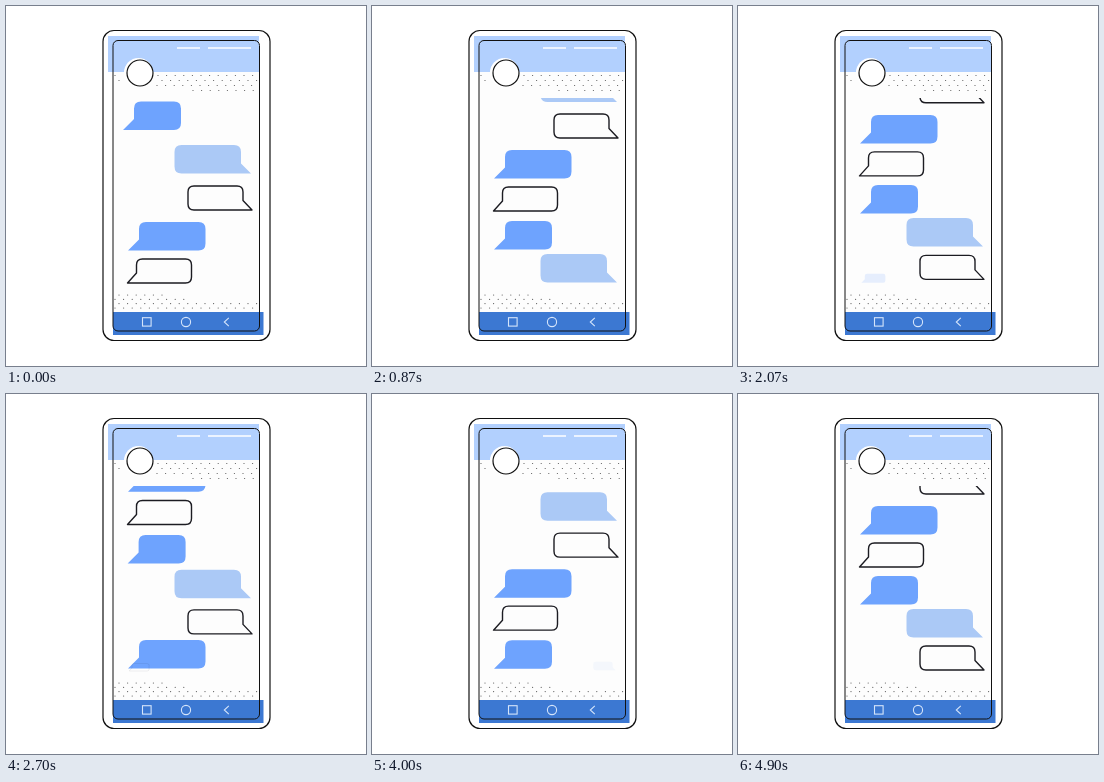
Recreate the animation shown at these times as an HTML page. Size 360 px wide and 360 px high, loop 5400 ms.

```html
<!DOCTYPE html>
<html lang="en">
<head>
<meta charset="utf-8">
<title>Chat on a phone</title>
<style>
  html, body { margin: 0; width: 100%; height: 100%; overflow: hidden; background: #fff; }
  svg { display: block; width: 100vw; height: 100vh; }
</style>
</head>
<body>
<svg viewBox="0 0 360 360" fill="none">
  <defs><clipPath id="view"><rect x="108" y="92" width="145" height="213"/></clipPath></defs>
  <rect x="97" y="24.5" width="167" height="310" rx="11" fill="#fff" stroke="#111" stroke-width="1.2"/>
  <rect x="107" y="35" width="146.5" height="290" rx="5" fill="#fdfdfd"/>
  <path d="M102 30H253V66H102Z" fill="#b2d0fe"/>
  <path d="M171 42H194M202 42H245" stroke="#fff" stroke-width="1.3"/>
  <g id="dots" fill="#555"></g>
  <path d="M107 306H257.5V329H107Z" fill="#3c78d2"/>
  <rect x="107" y="34.5" width="146.5" height="290.5" rx="5" stroke="#111"/>
  <g stroke="#d5e5fb" stroke-width="1.1">
    <rect x="136.5" y="311.7" width="8.6" height="8.4"/>
    <circle cx="180" cy="316" r="4.6"/>
    <path d="M222.8 311.8L218.3 316L222.8 320.2"/>
  </g>
  <circle cx="132.5" cy="66.5" r="14.5" fill="#fff"/>
  <circle cx="134" cy="67" r="13" fill="#fff" stroke="#111" stroke-width="1.2"/>
  <g id="chat" clip-path="url(#view)"></g>
</svg>
<script>
const LOOP = 5400;
const $ = id => document.getElementById(id);

function add(parent, tag, attrs) {
  const el = document.createElementNS('http://www.w3.org/2000/svg', tag);
  for (const key in attrs) el.setAttribute(key, attrs[key]);
  return parent.appendChild(el);
}

// Staggered dots: y, first x, last x
[[69.5, 109, 251], [74.5, 113, 251], [79.5, 151, 251], [84.5, 187, 251],
 [289, 113, 158], [293.3, 109, 185], [297.6, 113, 251], [302, 109, 251]]
  .forEach(([y, from, to]) => {
    for (let x = from; x <= to; x += 8.6) {
      if (y < 82 && Math.hypot(x - 134, y - 67) < 17) continue;
      add($('dots'), 'circle', { cx: x, cy: y, r: 0.6 });
    }
  });

// Bubble with its tail at the bottom; dir is 1 when the tail points left
function bubble(tail, near, far, h, r, notch, dir) {
  const d = r * dir;
  return `M${tail} ${h}L${near} ${notch}V${r}Q${near} 0 ${near + d} 0H${far - d}` +
    `Q${far} 0 ${far} ${r}V${h - r}Q${far} ${h} ${far - d} ${h}Z`;
}

const line = { stroke: '#1c1c22', 'stroke-width': 1.4, 'stroke-linejoin': 'round' };
const kinds = {
  short: { d: bubble(122, 133, 180, 28.5, 7, 17.5, 1), style: { fill: '#6ea3fe' }, x: 124, h: 28 },
  light: { d: bubble(245, 235, 168.5, 28.5, 7, 18.5, -1), style: { fill: '#abc9f6' }, x: 243, h: 28 },
  right: { d: bubble(246, 237, 182, 24, 6, 14.5, -1), style: line, x: 244, h: 24 },
  wide: { d: bubble(122, 133, 199.5, 28.5, 7, 17.5, 1), style: { fill: '#6ea3fe' }, x: 124, h: 28 },
  left: { d: bubble(121.5, 130.5, 185.5, 24, 6, 14, 1), style: line, x: 124, h: 24 }
};

// Kind, first stage it is present at, its top at each stage from there
const items = [
  ['short', 0, [95.5, 56.5, 23]],
  ['light', 0, [139, 100, 67.5, 35]],
  ['right', 0, [180, 141, 108, 76, 36]],
  ['wide', 0, [216, 177, 144, 112, 73, 25]],
  ['left', 0, [253, 214, 181, 149, 110, 66]],
  ['short', 1, [248, 215, 182, 145, 95.5]],
  ['light', 2, [248, 215, 179, 139]],
  ['right', 3, [252, 219, 180]],
  ['wide', 4, [248.5, 216]],
  ['left', 5, [253]]
].map(([name, first, tops]) => {
  const kind = kinds[name];
  const el = add($('chat'), 'path', { d: kind.d, ...kind.style });
  return { kind, first, tops, el, name };
});

// Scrolls: first change, last change, number of steps
const scrolls = [
  [70, 200, 5], [670, 870, 6], [1370, 1530, 5], [2070, 2200, 5],
  [2700, 2870, 5], [3403, 3570, 5], [4000, 4200, 6], [4730, 4900, 5]
];

const ease = p => p < 0.5 ? 2 * p * p : 1 - 2 * (1 - p) ** 2;

function stageAt(t) {
  let stage = 0;
  scrolls.forEach(([from, to, n], i) => {
    if (t < from) return;
    const step = Math.floor((t - from) / (to - from) * (n - 1) + 1e-6) + 1;
    stage = i % 5 + ease(Math.min(1, step / n));
  });
  return stage;
}

function shiftX(item, stage) {
  if (item.name !== 'short') return 0;
  return item.first === 0 ? -5 : -5 * Math.max(0, stage - 4);
}

function draw(t) {
  const stage = stageAt(t);
  for (const item of items) {
    const { kind, first, tops, el } = item;
    const at = stage - first;
    const i = Math.floor(at);
    const shown = at > -1 && i < tops.length;
    el.setAttribute('display', shown ? 'inline' : 'none');
    if (!shown) continue;
    let y = tops[Math.max(0, i)];
    if (i >= 0 && i + 1 < tops.length) y += (tops[i + 1] - y) * (at - i);
    const grow = Math.min(1, at + 1);
    const scale = 0.25 + 0.75 * grow;
    el.setAttribute('opacity', Math.min(1, grow * 2));
    el.setAttribute('transform',
      `translate(${kind.x + shiftX(item, stage)} ${y + kind.h}) scale(${scale}) translate(${-kind.x} ${-kind.h})`);
  }
}

const start = performance.now();
function tick() {
  draw((performance.now() - start) % LOOP);
  requestAnimationFrame(tick);
}
tick();
</script>
</body>
</html>
```
